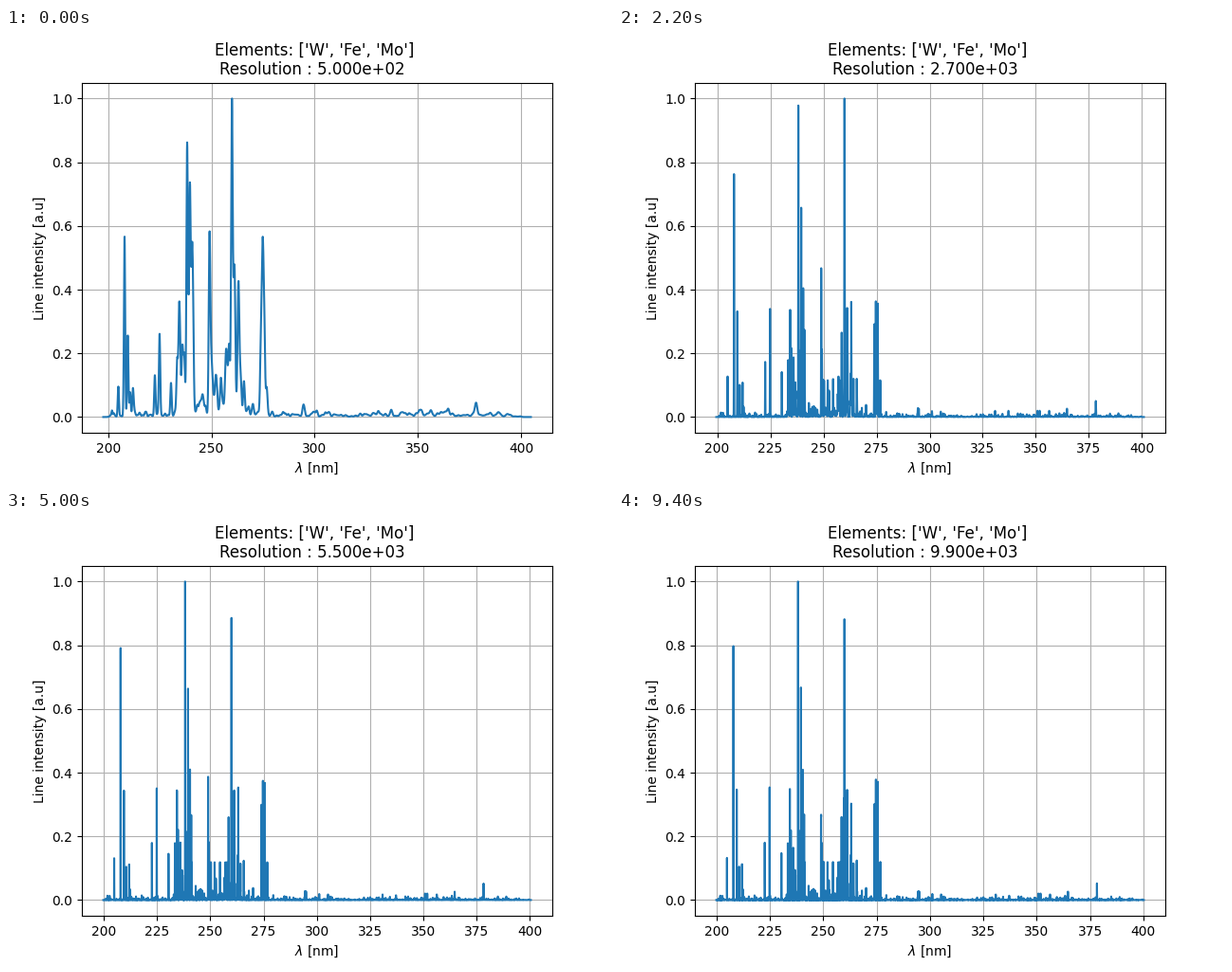
Recreate the animation shown at these times as a matplotlib script. Size 640x480 px, loop 9.6 s.

```python
import matplotlib.pyplot as plt
import numpy as np
from matplotlib.animation import FuncAnimation

FRAMES, INTERVAL = 48, 200
LO, HI = 200.0, 400.0
SAMPLES = 6  # grid points per line width
SPACING = 0.12  # mean gap between weak lines, nm

# Dominant lines: wavelength in nm -> relative intensity
STRONG = {
    204.9: .133, 207.91: .8, 209.47: .348, 210.6: .105, 211.95: .113,
    222.6: .18, 224.87: .355, 230.4: .147, 233.4: .18, 234.35: .35,
    234.83: .22, 235.95: .14, 238.2: 1, 238.35: .12, 238.86: .2,
    239.42: .14, 239.56: .67, 239.85: .25, 240.49: .41, 240.67: .18,
    241.05: .27, 248.95: .26, 249.0: .22, 249.3: .17, 258.59: .263,
    259.837: .32, 259.94: .884, 260.71: .2, 261.19: .348, 261.38: .2,
    262.83: .14, 263.105: .235, 263.132: .15, 265.7: .125, 273.95: .3,
    274.67: .38, 274.93: .362, 275.57: .373, 276.75: .12,
}

# Mean weak-line intensity along the spectrum, joined by straight segments
WEAK_AT = [200, 232, 233, 248, 251, 257, 259, 263.4, 264, 276, 278, 388, 398]
WEAK_MEAN = [.0014, .0014, .014, .014, .023, .023, .01, .01, .004, .004,
             .0013, .0012, .0001]


def build_lines():
    rng = np.random.default_rng(7)
    n = int((HI - LO) / SPACING)
    weak_pos = LO + (np.arange(n) + rng.random(n)) * SPACING
    # squared exponential draws: mostly faint, a few prominent
    weak_amp = np.interp(weak_pos, WEAK_AT, WEAK_MEAN)
    weak_amp *= rng.exponential(size=n) ** 2 / 2
    pos = np.append(list(STRONG), weak_pos)
    amp = np.append(list(STRONG.values()), np.minimum(weak_amp, .12))
    return np.log(pos), amp


LINE_POS, LINE_AMP = build_lines()


def spectrum(res):
    """Sum of Gaussians of relative width 1/res, scaled to a peak of one."""
    step = 1 / (SAMPLES * res)
    start = np.log(LO * (1 - 6 / res))
    stop = np.log(HI * (1 + 6 / res))
    grid = start + step * np.arange(int(round((stop - start) / step)) + 1)
    reach = np.arange(-4 * SAMPLES, 4 * SAMPLES + 1)
    centre = np.rint((LINE_POS - start) / step).astype(int)
    idx = centre[:, None] + reach
    offset = (grid[idx] - LINE_POS[:, None]) * res
    values = LINE_AMP[:, None] * np.exp(-offset ** 2)
    total = np.bincount(idx.ravel(), values.ravel(), minlength=grid.size)
    return np.exp(grid), total / total.max()


fig, ax = plt.subplots(figsize=(6.4, 4.8), dpi=100)
line, = ax.plot([], [])
ax.set_xlabel(r"$\lambda$ [nm]")
ax.set_ylabel("Line intensity [a.u]")
ax.grid()


def update(i):
    res = 500 + 200 * i
    line.set_data(*spectrum(res))
    ax.relim()
    ax.autoscale_view()
    ax.set_title(f"Elements: ['W', 'Fe', 'Mo'] \nResolution : {res:.3e}  ")
    return line,


anim = FuncAnimation(fig, update, frames=FRAMES, interval=INTERVAL,
                     repeat=True, repeat_delay=0)
plt.show()
```
